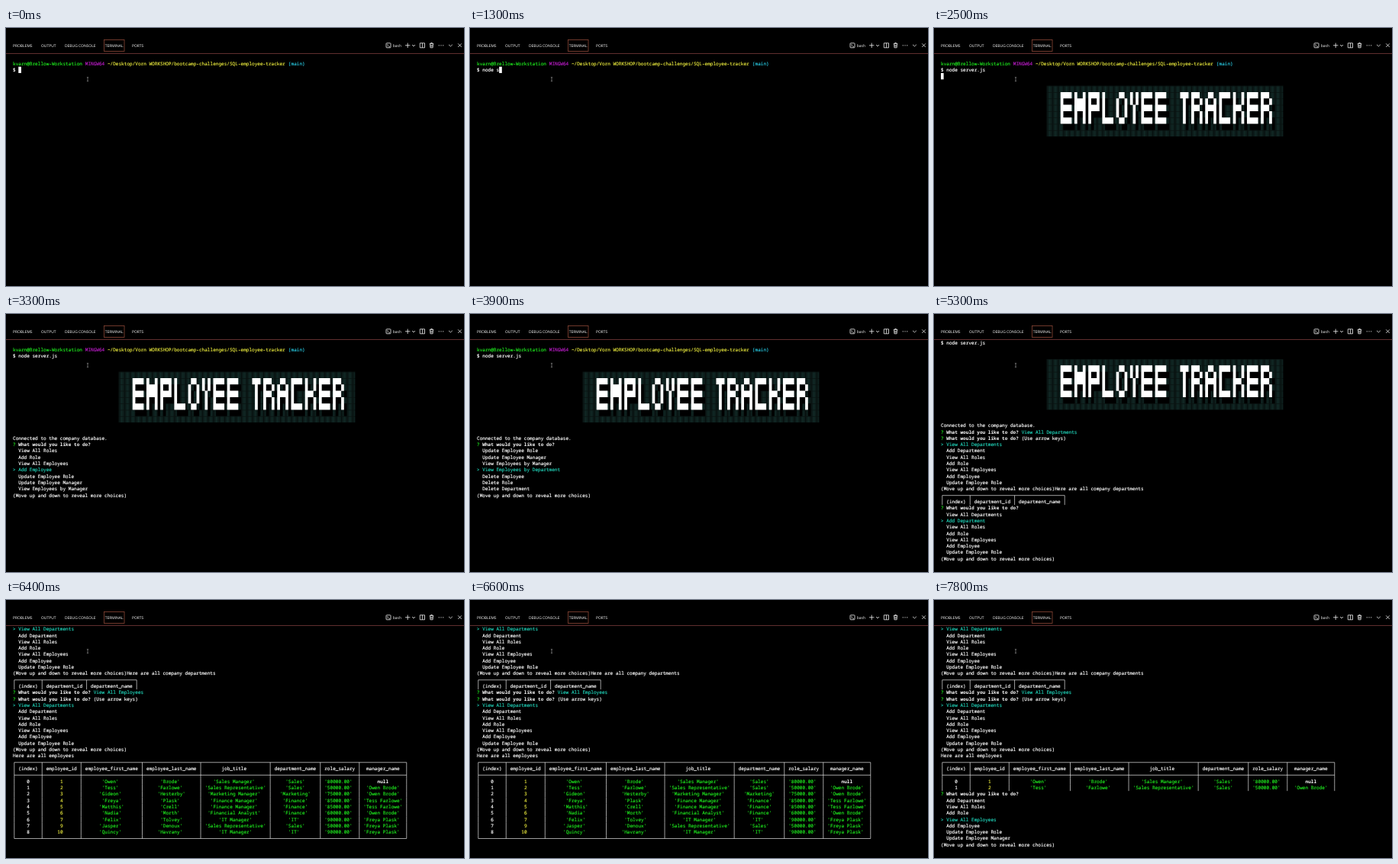
An HTML page for the animation above (8 s loop, 600x338 px).

```html
<!DOCTYPE html>
<html lang="en">
<head>
<meta charset="utf-8">
<title>Employee tracker terminal</title>
<style>
  html, body { margin: 0; width: 100%; height: 100%; overflow: hidden; background: #000; }
  svg { display: block; width: 100vw; height: 100vh; }
  text { text-rendering: geometricPrecision; white-space: pre; }
  .tabs { font: 4.95px "Open Sans", sans-serif; fill: #fff; }
  .icons { fill: none; stroke: #fff; stroke-width: .75; }
  #term { font: 6.075px "Noto Sans Mono", monospace; }
  #term text { stroke-width: .16; }
  .rule { fill: none; stroke: #e4e4e4; stroke-width: .7; }
</style>
</head>
<body>
<svg viewBox="0 0 600 338" xmlns="http://www.w3.org/2000/svg">
  <defs>
    <pattern id="weave" x="147.5" y="75.65" width="7.29" height="8.31" patternUnits="userSpaceOnUse">
      <rect width="7.29" height="8.31" fill="#0d1e1c"/>
      <path d="M.6 0V8.31" stroke="#060d0c" stroke-width="1.2"/>
      <path d="M4.2 0V8.31" stroke="#112b27" stroke-width="1.2"/>
      <path d="M0 .4H7.29" stroke="#081110" stroke-width=".8"/>
    </pattern>
  </defs>
  <rect width="600" height="338"/>
  <g class="tabs">
    <text x="9" y="24.7">PROBLEMS</text>
    <text x="46" y="24.7">OUTPUT</text>
    <text x="77" y="24.7">DEBUG CONSOLE</text>
    <text x="129.7" y="24.7">TERMINAL</text>
    <text x="165" y="24.7">PORTS</text>
    <text x="506.8" y="24.7">bash</text>
  </g>
  <rect x="128.5" y="15.5" width="26.5" height="15" fill="none" stroke="#8a4636" stroke-width=".8"/>
  <path d="M0 33.5H600" stroke="#6a3434" stroke-width=".9"/>
  <g class="icons">
    <rect x="498" y="19.8" width="6" height="6" rx=".8"/>
    <path d="M499.3 21.3l1.5 1.4l-1.5 1.4M501.3 24.4h1.6"/>
    <path d="M523 22.8h6.4M526.2 19.6v6.4"/>
    <path d="M532 22l2 2l2-2"/>
    <path d="M542.3 19.8h6.2v6h-6.2zM545.4 19.8v6"/>
    <path d="M554.8 20.6h5.4M556.6 20.4v-.9h1.8v.9M555.5 20.8l.4 5h3.2l.4-5M556.9 22v2.6M558.1 22v2.6"/>
    <path d="M580 21.8l2.4 2.2l2.4-2.2M592.2 20.4l4.6 4.6M596.8 20.4l-4.6 4.6"/>
  </g>
  <path d="M567.2 22.8h.01M570 22.8h.01M572.8 22.8h.01" stroke="#fff" stroke-width="1.2" stroke-linecap="round"/>
  <g id="term"></g>
  <path d="M105.9 64.4q1.1 0 1.1 .8q0-.8 1.1-.8M107 65v4.2M105.9 69.8q1.1 0 1.1-.8q0 .8 1.1 .8" fill="none" stroke="#a8a8a8" stroke-width=".6"/>
</svg>
<script>
const LOOP = 8000, CW = 3.645, RH = 8.31, LEFT = 9, TOP = 34.1, VISIBLE = 35;
const WHITE = '#fff', GREEN = '#1ee61e', YELLOW = '#e6e63c', PURPLE = '#b81cc4', CYAN = '#28c8e0', TEAL = '#20d2b8';
const term = document.getElementById('term');
const colX = c => LEFT + c * CW;
const px = n => n.toFixed(2);

// Rows are lists of [text, colour, bold] spans, or objects for rules and the banner.
const line = (text, color = WHITE) => [[text, color]];
const blanks = n => Array.from({ length: n }, () => []);

const choices = ['View All Departments', 'Add Department', 'View All Roles', 'Add Role',
  'View All Employees', 'Add Employee', 'Update Employee Role', 'Update Employee Manager',
  'View Employees by Manager', 'View Employees by Department', 'Delete Employee',
  'Delete Role', 'Delete Department'];
const question = (tail = '', color = WHITE) =>
  [['?', GREEN], [' What would you like to do? ', WHITE, true], [tail, color]];
const hint = '(Move up and down to reveal more choices)';

// The pointer sinks to the fourth line, then the list scrolls under it.
function list(step) {
  const pointer = Math.min(step, 3);
  return Array.from({ length: 7 }, (_, i) => {
    const name = choices[(step - pointer + i) % choices.length];
    return i === pointer ? line('> ' + name, TEAL) : line('  ' + name);
  });
}
const menu = (step, note = '') =>
  [question(step ? '' : '(Use arrow keys)'), ...list(step), line(hint + note)];

function table(heads, data) {
  const cells = data.map((r, i) => [i, ...r].map((v, c) =>
    v === null ? ['null', WHITE, true] : c === 0 ? [String(v), WHITE]
      : typeof v === 'number' ? [String(v), YELLOW] : [`'${v}'`, GREEN]));
  const titles = ['(index)', ...heads].map(h => [h, WHITE]);
  const widths = titles.map((h, c) => 2 + Math.max(h[0].length, ...cells.map(r => r[c][0].length)));
  const row = list => Object.assign(list.flatMap(([text, color, bold], c) => {
    const pad = widths[c] - text.length, before = pad >> 1;
    return [[' '.repeat(before + 1), color], [text, color, bold], [' '.repeat(pad - before), color]];
  }), { widths });
  return [{ rule: 'top', widths }, row(titles), { rule: 'mid', widths },
    ...cells.map(row), { rule: 'bottom', widths }, []];
}

const departments = table(['department_id', 'department_name'],
  ['Sales', 'Marketing', 'Finance', 'IT', 'Legal', 'Support'].map((d, i) => [i + 1, d]));

const boss = ['Owen Brode', 'Tess Farlowe', 'Freya Plask'];
const employees = table(
  ['employee_id', 'employee_first_name', 'employee_last_name', 'job_title',
    'department_name', 'role_salary', 'manager_name'],
  [
    [1, 'Owen', 'Brode', 'Sales Manager', 'Sales', '80000.00', null],
    [2, 'Tess', 'Farlowe', 'Sales Representative', 'Sales', '50000.00', boss[0]],
    [3, 'Gideon', 'Hesterby', 'Marketing Manager', 'Marketing', '75000.00', boss[0]],
    [4, 'Freya', 'Plask', 'Finance Manager', 'Finance', '85000.00', boss[1]],
    [5, 'Matthis', 'Crell', 'Finance Manager', 'Finance', '85000.00', boss[1]],
    [6, 'Nadia', 'Morth', 'Financial Analyst', 'Finance', '60000.00', boss[0]],
    [7, 'Felix', 'Tolvey', 'IT Manager', 'IT', '90000.00', boss[2]],
    [9, 'Jasper', 'Denoux', 'Sales Representative', 'Sales', '50000.00', boss[2]],
    [10, 'Quincy', 'Havrany', 'IT Manager', 'IT', '90000.00', boss[2]]
  ]);

const command = 'node server.js';
const shell = typed => [[],
  [['kvarn@Brellow-Workstation ', GREEN], ['MINGW64 ', PURPLE],
    ['~/Desktop/Vorn WORKSHOP/bootcamp-challenges/SQL-employee-tracker ', YELLOW], ['(main)', CYAN]],
  line('$ ' + command.slice(0, typed))];

const started = [...shell(command.length), ...blanks(2), { banner: true }, ...blanks(9)];
const connected = [...started, line('Connected to the company database.')];
const firstTable = [...connected, question(choices[0], TEAL),
  ...menu(0, 'Here are all company departments'), ...departments];
// Redrawing the menu wipes the last nine rows.
const firstKept = firstTable.slice(0, -9);
const secondTable = [...firstKept, question(choices[4], TEAL), ...menu(0),
  line('Here are all employees'), ...employees];
const secondKept = secondTable.slice(0, -9);

const cursor = (col, row) => ({ col, row });
const steps = [];
const add = (time, rows, caret) => steps.push({ time, rows, caret });

[0, 1, 3, 5, 6, 9, 12, 14].forEach((n, i) => add(i ? 900 + i * 100 : 0, shell(n), cursor(n + 2, 2)));
add(1800, shell(command.length), cursor(0, 3));
add(2300, started, cursor(0, 3));
add(2600, [...connected, ...menu(0)]);
for (let k = 1; k <= 13; k++) add(k < 10 ? 2620 + k * 130 : 4000 + (k - 10) * 130, [...connected, ...menu(k)]);
add(4600, firstTable);
[[5200, 1], [5600, 3], [5800, 4]].forEach(([time, k]) => add(time, [...firstKept, ...menu(k)]));
add(6400, secondTable);
[[7200, 1], [7400, 2], [7500, 3], [7700, 4]].forEach(([time, k]) => add(time, [...secondKept, ...menu(k)]));

const glyphs = {
  E: '####|#...|####|#...|####', M: '#..#|####|####|#..#|#..#',
  P: '####|#..#|####|#...|#...', L: '#...|#...|#...|#...|####',
  O: '.##.|#..#|#..#|#..#|.##.', Y: '#.#|#.#|.#.|.#.|.#.',
  T: '###|.#.|.#.|.#.|.#.', R: '###.|#..#|###.|#..#|#..#',
  A: '.##.|#..#|####|#..#|#..#', C: '####|#...|#...|#...|####',
  K: '#..#|#..#|###.|#..#|#..#'
};
function bannerPath() {
  let col = 5, d = '';
  for (const ch of 'EMPLOYEE TRACKER') {
    if (ch === ' ') { col += 4; continue; }
    const rows = glyphs[ch].split('|');
    rows.forEach((r, y) => [...r].forEach((c, x) => {
      if (c === '#') d += `M${px((col + x) * CW)} ${px((y + 1) * RH)}h${CW + .05}v${RH + .05}h-${CW + .05}z`;
    }));
    col += rows[0].length + 1;
  }
  return d;
}
const letters = bannerPath();
const banner = y => `<g transform="translate(0 ${px(y - TOP - 5 * RH)})">
  <rect x="${px(colX(38))}" y="${px(TOP + 5 * RH)}" width="${px(85 * CW)}" height="${px(8 * RH)}" fill="url(#weave)"/>
  <g transform="translate(${px(colX(38))} ${px(TOP + 5 * RH)})">
    <path d="${letters}" transform="translate(${CW} ${RH})"/><path d="${letters}" fill="#fff"/>
  </g></g>`;

function rules({ widths, rule }, y) {
  const xs = [colX(.5)];
  widths.forEach(w => xs.push(xs[xs.length - 1] + (w + 1) * CW));
  const from = rule === 'top' ? y + RH / 2 : y;
  const to = rule === 'bottom' ? y + RH / 2 : y + RH;
  let d = xs.map(x => `M${px(x)} ${px(from)}V${px(to)}`).join('');
  if (rule) d += `M${px(xs[0])} ${px(y + RH / 2)}H${px(xs[xs.length - 1])}`;
  return `<path class="rule" d="${d}"/>`;
}

function spans(row, y) {
  let col = 0, out = '';
  for (const [text, color, bold] of row) {
    const lead = text.length - text.trimStart().length;
    if (text.trim()) {
      const ink = bold ? `font-weight="700"` : `stroke="${color}"`;
      out += `<text x="${px(colX(col + lead))}" y="${px(y + 6.1)}" fill="${color}" ${ink}>` +
        `${text.trim().replace('>', '&gt;')}</text>`;
    }
    col += text.length;
  }
  return out;
}

function draw({ rows, caret }) {
  let out = '';
  rows.slice(-VISIBLE).forEach((row, i) => {
    const y = TOP + i * RH;
    if (row.banner) out += banner(y);
    if (row.widths) out += rules(row, y);
    if (Array.isArray(row)) out += spans(row, y);
  });
  if (caret) {
    out += `<rect x="${px(colX(caret.col))}" y="${px(TOP + caret.row * RH)}" width="${CW}" height="${RH}" fill="#fff"/>`;
  }
  term.innerHTML = out;
}

let shown;
function tick() {
  const t = performance.now() % LOOP;
  let now = steps[0];
  for (const s of steps) if (s.time <= t) now = s;
  if (now !== shown) draw(shown = now);
  requestAnimationFrame(tick);
}
tick();
</script>
</body>
</html>
```
